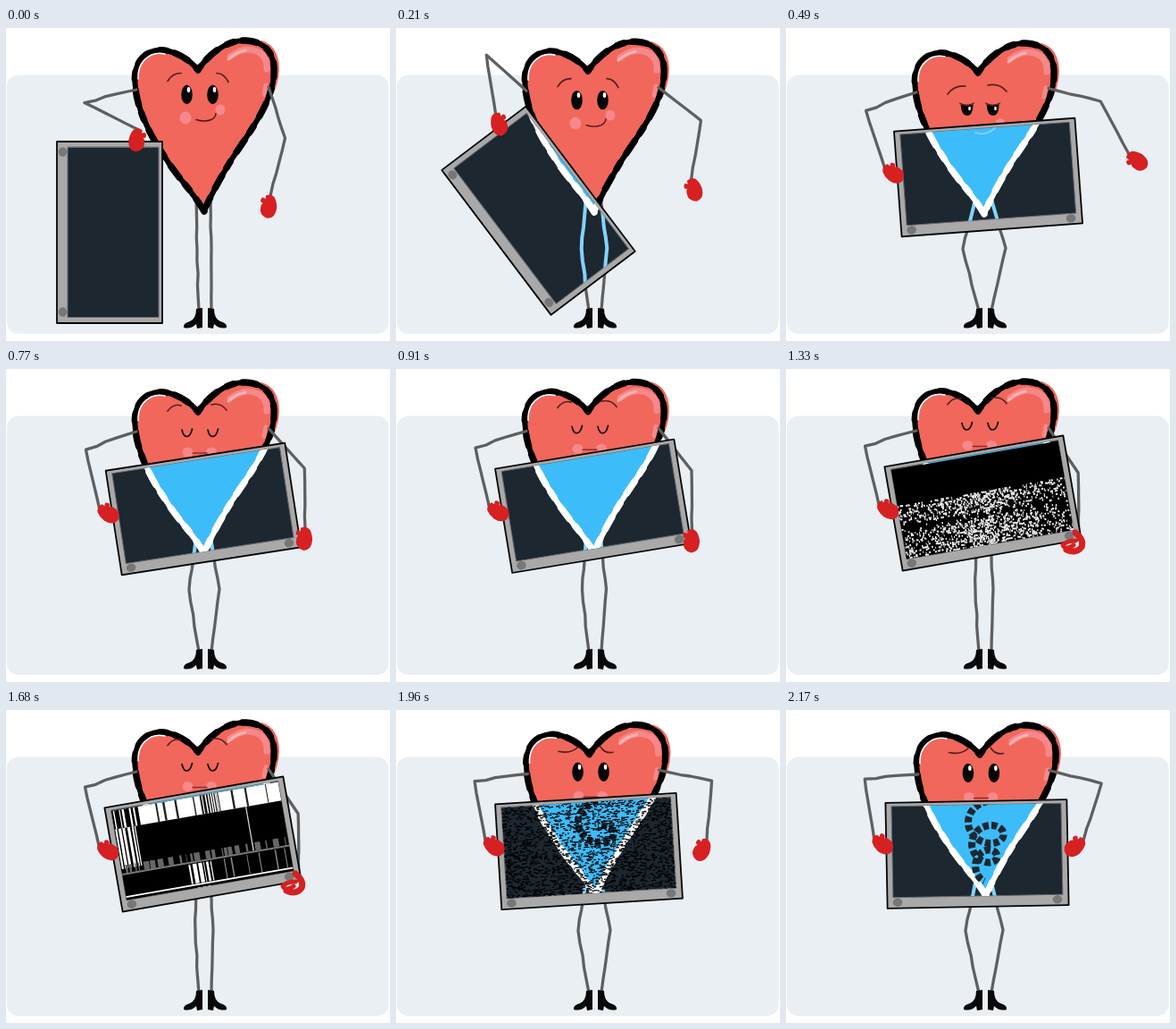
Animation, 430 px wide and 350 px high, one loop 2.24 s. Source, as an HTML page with a canvas:

```html
<!DOCTYPE html>
<html lang="en">
<head>
<meta charset="utf-8">
<title>Heart with scanner</title>
<style>
html, body { margin: 0; width: 100%; height: 100%; overflow: hidden; background: #fff; }
canvas { display: block; width: 430px; height: 350px; }
</style>
</head>
<body>
<canvas id="stage" width="430" height="350"></canvas>
<script>
const ctx = document.getElementById('stage').getContext('2d');
const STEP = 70, STEPS = 32;
const RED = '#f1675c', PINK = '#f6888b', MITT = '#d62022', DARK = '#1c2730';
const BLUE = '#3dbcfa', PALE = '#83d3fb', LIMB = '#605f5f', INK = '#050505', BROW = '#56201e';

// Key poses, held from step `from` to `to`: screen centre and tilt, head shift,
// eye height, free wrist and its turn, knee bend.
const POSES = [
  { from: 0, to: 0, x: 116, y: 228.5, tilt: 90, hx: 0, hy: 0, eyes: 74.5, wx: 296, wy: 188, turn: 8, bend: 0 },
  { from: 7, to: 8, x: 226.5, y: 167, tilt: -4.2, hx: 0, hy: 3, eyes: 90, wx: 384, wy: 141, turn: -52, bend: 16 },
  { from: 11, to: 11, x: 221, y: 156.5, tilt: -8.8, hx: 0, hy: 1, eyes: 72, wx: 335, wy: 178, turn: 4, bend: 9 },
  { from: 15, to: 25, x: 220.5, y: 150, tilt: -9.9, hx: 0, hy: 0, eyes: 64.5, wx: 328, wy: 183, turn: 0, bend: 2 },
  { from: 27, to: 27, x: 218, y: 155, tilt: -6, hx: 1, hy: 2, eyes: 68, wx: 363, wy: 146, turn: 0, bend: 7 },
  { from: 29, to: 31, x: 214, y: 161, tilt: -1.1, hx: 2, hy: 3, eyes: 70.5, wx: 333, wy: 146, turn: 53, bend: 13 }
];

const HEART = new Path2D('M222 205C207 180 191 166 179 146C160 118 146 90 144.500 62C142 36 159 23 177 25' +
  'C194 27 208 38 215 47C225 32 245 13 269 14C291 15 302 30 300 52C298 85 270 120 252 148C240 168 230 185 222 205Z');
const BOOT = new Path2D('M213 314L220 313L220 335L214 336L213 331Q207 337 199 335Q198 330 206 328Q213 325 213 314Z');

function poseAt(s) {
  const i = POSES.findLastIndex(p => p.from <= s);
  const a = POSES[i], b = POSES[i + 1] || a;
  const t = s <= a.to ? 0 : (s - a.to) / (b.from - a.to);
  const k = t * t * (3 - 2 * t), pose = {};
  for (const key in a) pose[key] = a[key] + (b[key] - a[key]) * k;
  return pose;
}

function seeded(seed) {
  let n = seed * 7919 + 17;
  return () => (n = (n * 48271) % 2147483647) / 2147483647;
}

function pen(path, color, width) {
  ctx.strokeStyle = color;
  ctx.lineWidth = width;
  ctx.stroke(typeof path === 'string' ? new Path2D(path) : path);
}

function fill(path, color) {
  ctx.fillStyle = color;
  ctx.fill(typeof path === 'string' ? new Path2D(path) : path);
}

function oval(x, y, rx, ry, color) {
  ctx.beginPath();
  ctx.ellipse(x, y, rx, ry, 0, 0, Math.PI * 2);
  ctx.fillStyle = color;
  ctx.fill();
}

function box(x, y, w, h, color) {
  ctx.fillStyle = color;
  ctx.fillRect(x, y, w, h);
}

function layer(draw, x = 0, y = 0, deg = 0, flip = 1) {
  ctx.save();
  ctx.translate(x, y);
  ctx.rotate(deg * Math.PI / 180);
  ctx.scale(flip, 1);
  draw();
  ctx.restore();
}

// Hand-drawn polyline with a small fixed wobble.
function limb(points, color, width, seed) {
  const rnd = seeded(seed), line = new Path2D();
  points.forEach(([x, y], i) => {
    if (!i) return line.moveTo(x, y);
    const [px, py] = points[i - 1];
    for (let k = 1; k <= 5; k++) {
      const w = k < 5 ? rnd() * 1.6 - .8 : 0;
      line.lineTo(px + (x - px) * k / 5 + w, py + (y - py) * k / 5 + w);
    }
  });
  pen(line, color, width);
}

// Two bones of fixed length; the elbow points outward.
function arm(sx, sy, wx, wy, side) {
  const upper = 60, lower = 67;
  const d = Math.hypot(wx - sx, wy - sy), ux = (wx - sx) / d, uy = (wy - sy) / d;
  const along = (upper ** 2 - lower ** 2 + d * d) / (2 * d);
  const out = side * Math.sqrt(Math.max(0, upper ** 2 - along ** 2));
  limb([[sx, sy], [sx + ux * along + uy * out, sy + uy * along - ux * out], [wx, wy]], LIMB, 3.3, 8 + side);
}

function legs(p, color, width) {
  limb([[213, 188], [214 - p.bend, 247], [216, 316]], color, width, 3);
  limb([[229, 188], [230 + p.bend, 246], [230, 316]], color, width, 8);
}

function outline(color) {
  pen(HEART, color, 6);
  ctx.setLineDash([16, 13, 8, 10]);
  pen(HEART, color, 7.4);
  ctx.setLineDash([]);
}

function heart() {
  pen('M286 16Q304 22 304 47Q303 65 294 79', RED, 4);
  fill(HEART, RED);
  outline('#000');
  pen('M148 57Q147 38 163 30Q170 27 178 29', '#fff', 1.6);
  pen('M251 32Q268 19 283 27Q293 33 292 46', PINK, 7);
  pen('M249 35Q257 27 268 25', '#f9b3b0', 3);
  pen('M291 64L289 74', PINK, 5);
}

function openEye(x) {
  oval(x, 0, 6.3, 10.7, INK);
  oval(x + 2, -5.5, 1.8, 3, '#fff');
}

function slyEye(x) {
  layer(() => {
    fill('M-7 -5Q0 -2 7 -5Q7 8 0 8Q-6 8 -7 -5Z', INK);
    oval(3, 0, 1.3, 2.2, '#fff');
    pen('M-8 -6Q0 -2 8 -6', BROW, 1.2);
  }, x, 0);
}

function closedEye(x) {
  layer(() => pen('M-5.500 -4Q-4 3.500 0 3.500Q4 3.500 6 -5', '#1a0d0d', 1.7), x, 0);
}

const MOODS = {
  smile: { eye: openEye, brows: 'M-36 -15Q-31 -24 -21 -24M19 -24Q27 -24 32 -14' },
  sly: { eye: slyEye, brows: 'M-36 -16Q-29 -26 -16 -25M9 -26Q22 -29 30 -19' },
  calm: { eye: closedEye, brows: 'M-36 -25Q-29 -34 -21 -31M13 -32Q23 -35 30 -26', mouth: 21 },
  worried: { eye: openEye, brows: 'M-36 -23Q-22 -20 -14 -28M11 -28Q16 -20 25 -22', mouth: 27 }
};

function moodAt(s) {
  return MOODS[s < 5 ? 'smile' : s < 10 ? 'sly' : s < 27 ? 'calm' : 'worried'];
}

function face(mood) {
  if (mood.mouth) {
    oval(-13.500, mood.mouth, 6, 5.5, PINK);
    oval(13, mood.mouth, 6, 5.5, PINK);
    pen(`M-8 ${mood.mouth + 1}h16`, '#8b2e2c', 1.4);
  } else {
    oval(-16, 26, 6.5, 7, PINK);
    oval(23, 17, 5.5, 6, PINK);
    pen('M-4 28Q5 31 13 28Q18 25 18 21', '#541614', 1.4);
  }
  mood.eye(-14.5);
  mood.eye(14.5);
  pen(mood.brows, BROW, 1.7);
}

// Cursive loops that shrink on the way down.
function curl(turns) {
  const path = new Path2D();
  for (let t = 0; t <= turns * Math.PI; t += .1) {
    path.lineTo(226 - t / 4 - (23 - .9 * t) * Math.sin(t), 120 + 3.9 * t - (18 - .5 * t) * Math.cos(t));
  }
  ctx.lineCap = 'butt';
  ctx.setLineDash([6.5, 3]);
  pen(path, DARK, 8);
  ctx.setLineDash([]);
  ctx.lineCap = 'round';
}

function xray(s, p) {
  legs(p, PALE, 4);
  layer(() => { fill(HEART, BLUE); outline('#fff'); }, p.hx, p.hy);
  if (!moodAt(s).mouth) layer(() => pen('M-5 27Q6 31 17 22', PALE, 1.8), 217, p.eyes);
  if (s >= 28) curl(Math.min(5, s - 26));
}

// Fine specks; chance(x, y) gives the local density.
function grain(s, color, w, h, chance) {
  const rnd = seeded(s + 40);
  for (let y = -55; y < 47; y += h) {
    for (let x = -95; x < 95;) {
      const len = w * (.4 + rnd());
      if (rnd() < chance(x, y)) box(x, y + rnd() - .5, len, h, color);
      x += len;
    }
  }
}

function snow(s) {
  box(-95, -54, 190, 101, '#000');
  const shift = (s - 19) * 7;
  grain(s, '#fff', 1.6, 2, (x, y) => {
    const v = y - shift, middle = Math.exp(-((x - 5) ** 2) / 1800);
    if (v < -13) return 0;
    return (.24 + .32 * middle) * (1 - .75 * Math.exp(-((v - 12) ** 2) / 25));
  });
}

function bars(rnd, x, end, y, h, color, gap, width = 2.6) {
  while (x < end) {
    const w = .7 + rnd() * width;
    box(x, y, Math.min(w, end - x), h, color);
    x += w + .7 + rnd() * gap;
  }
}

function stripes(s) {
  const rnd = seeded(s), drift = (s - 24) * 5;
  box(-95, -54, 190, 101, '#000');
  box(-95, -54, 190, 21, '#fff');
  bars(rnd, -95, -64, -54, 21, '#000', 2, 5);
  bars(rnd, 6 + drift, 24 + drift, -54, 21, '#111', 1);
  bars(rnd, -45, 95, -54, 21, '#222', 24);
  bars(rnd, -94, -71, -33, 45, '#fff', 3);
  bars(rnd, -90, 92, 8, 9, '#666', 7, 6);
  box(54, -33, 1.2, 50, '#ddd');
  box(-95, 17, 190, 2, '#777');
  bars(rnd, -20 + drift, 6 + drift, 20, 22, '#fff', 2, 4);
  bars(rnd, 20, 92, 20, 22, '#888', 20, 1);
  box(-95, 42.5, 190, 1.8, '#fff');
}

function glitch(s) {
  if (s >= 18 && s < 22) snow(s);
  else if (s >= 22 && s < 28) stripes(s);
  else if (s >= 15 && s <= 28) grain(s, '#000', 2.6, 1.3, () => s === 16 || s === 17 ? .58 : .35);
}

function screen(s, p) {
  layer(() => {
    const frame = new Path2D(), glass = new Path2D();
    frame.rect(-101.5, -59, 203, 118);
    glass.rect(-95, -55, 190, 102);
    fill(frame, '#aaa9aa');
    pen(frame, INK, 1.8);
    for (const x of [-90, 89]) oval(x, 52.5, 5.3, 4.7, '#777');
    fill(glass, DARK);
    pen(glass, '#68696b', 1);
    ctx.clip(glass);
    if (s >= 3) {
      ctx.save();
      ctx.setTransform(1, 0, 0, 1, 0, 0);
      xray(s, p);
      ctx.restore();
    }
    glitch(s);
  }, p.x, p.y, p.tilt);
}

function mitten(x, y, deg, side) {
  layer(() => fill('M-5 0Q1 -3 5 1Q8 5 9 12Q9 24 0 25Q-10 23 -9 13Q-9 10 -7 9Q-12 8 -9 3Q-7 2 -5 4Z', MITT),
    x, y, deg, side);
}

// Fingers curled over the corner; they tighten once.
function grip(tight) {
  pen(tight ? 'M324 183Q334 191 331 199Q325 207 314 202' : 'M308 194Q320 194 327 189Q336 197 330 203L322 204', MITT, 7);
  pen(tight ? 'M324 192Q314 192 310 197Q313 203 322 197' : 'M316 188Q314 181 321 181Q328 181 327 188', MITT, 5);
}

// The left wrist stays on the screen's edge.
function leftWrist(p) {
  const a = p.tilt * Math.PI / 180, x = -115, y = -20 - .13 * p.tilt;
  return [p.x + x * Math.cos(a) - y * Math.sin(a), p.y + x * Math.sin(a) + y * Math.cos(a)];
}

function draw(s) {
  const p = poseAt(s), [lx, ly] = leftWrist(p);
  ctx.lineCap = ctx.lineJoin = 'round';
  box(0, 0, 430, 350, '#fff');
  ctx.beginPath();
  ctx.roundRect(1, 52.5, 427.5, 289.5, 13);
  ctx.fillStyle = '#e9eff3';
  ctx.fill();

  legs(p, LIMB, 3.3);
  fill(BOOT, '#08080a');
  layer(() => fill(BOOT, '#08080a'), 446, 0, 0, -1);
  layer(heart, p.hx, p.hy);
  layer(() => face(moodAt(s)), 217 + p.hx * .7, p.eyes);
  arm(146 + p.hx, 69 + p.hy, lx, ly, -1);
  arm(294 + p.hx / 2, 66 + p.hy / 2, p.wx, p.wy, 1);
  screen(s, p);
  mitten(lx, ly, p.tilt * .65 - 52, -1);
  if (s >= 15 && s < 26) grip(s > 16);
  else mitten(p.wx, p.wy, p.turn, 1);
}

const start = performance.now();
let shown = -1;
function tick() {
  const s = Math.floor((performance.now() - start) / STEP) % STEPS;
  if (s !== shown) draw(shown = s);
  requestAnimationFrame(tick);
}
tick();
</script>
</body>
</html>
```
